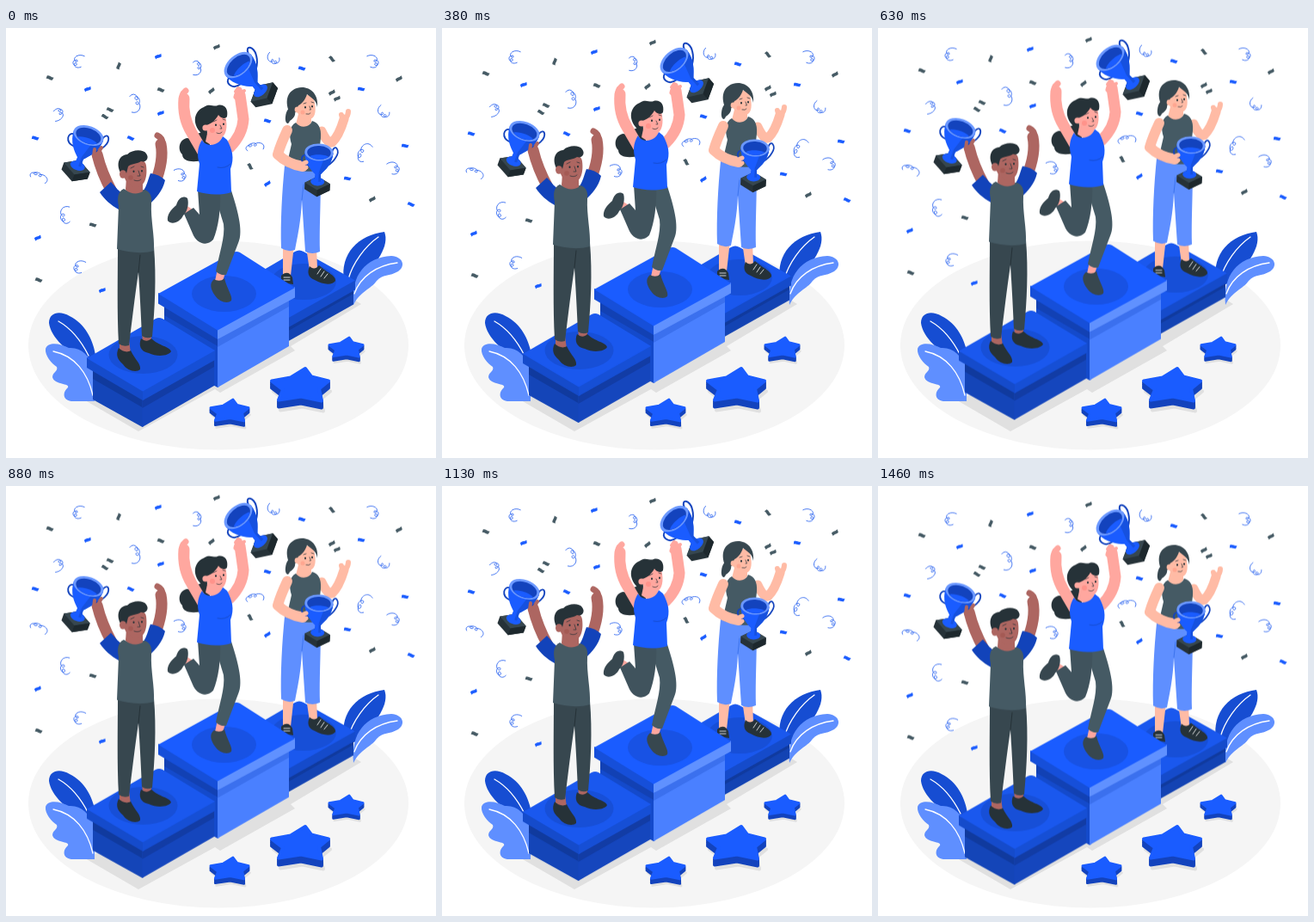
Write an HTML page that moves like this. It is 500 px wide and 500 px high and loops after 1.5 s.

```html
<!DOCTYPE html>
<html lang="en">
<head>
<meta charset="utf-8">
<title>Winners' podium</title>
<style>
html, body { margin: 0; width: 100%; height: 100%; overflow: hidden; background: #fff; }
svg { display: block; width: 100vw; height: 100vh; }
.line { fill: none; stroke-linecap: round; stroke-linejoin: round; }
.vein { stroke: #fff; stroke-width: 1.3; }
.face { stroke: #263238; stroke-width: .7; }
.eyes { stroke: #263238; stroke-width: 2; }
#curl { vector-effect: non-scaling-stroke; }
</style>
</head>
<body>
<svg viewBox="0 0 500 500">
  <defs>
    <path id="starTop" stroke-width="4" stroke-linejoin="round" d="M6 -19.500 L13 -10 L33 -5 L22 4 L25 18 L1 13 L-25 17 L-20 5 L-33 -5 L-11 -9Z"/>
    <g id="star">
      <use href="#starTop" y="12" x="2" fill="#e0e0e0" stroke="#e0e0e0"/>
      <g fill="#1343bd" stroke="#1343bd">
        <use href="#starTop" y="8"/><use href="#starTop" y="6"/><use href="#starTop" y="4"/><use href="#starTop" y="2"/>
      </g>
      <use href="#starTop" fill="#1a5cff" stroke="#1a5cff"/>
    </g>
    <g id="cup">
      <path fill="#263238" d="M-15.500 38 L0 29.500 L15.500 38 V46 L0 54.500 L-15.500 46Z"/>
      <path fill="#37474f" d="M-15.500 38 L0 29.500 L15.500 38 L0 46.500Z"/>
      <path fill="#1d282d" d="M0 46.500 L15.500 38 V46 L0 54.500Z"/>
      <ellipse cy="36" rx="8.500" ry="5" fill="#1a5cff"/>
      <path class="line" stroke="#1343bd" stroke-width="1.800" d="M-16 4 C-23 4 -23 16 -11 17 M16 -2 C19 -12 26 -4 21 5 C18 11 14 14 11 16"/>
      <path fill="#1a5cff" d="M-17.500 0 C-17 14 -9 22 -3.500 27 L-4 36 H4 L3.500 27 C9 21 16.500 14 17.500 0Z"/>
      <path fill="#1651df" d="M6 9 C11 8 16 5 17.500 0 C16.500 14 9 21 3.500 27 L4 36 H1 V25Z"/>
      <ellipse rx="17.500" ry="10.500" fill="#6b98ff"/>
      <ellipse cy=".5" rx="14.500" ry="8.400" fill="#1343bd"/>
      <path fill="#1a5cff" d="M-11 5.500 C-6 2 8 2 12 5 C7 10 -6 10 -11 5.500Z"/>
    </g>
    <path id="chip" d="M-4.500 -1 C-2 -3 1 -1 4.500 -2.500 L4 1.500 C1 3 -2 1 -4 3Z"/>
    <path id="curl" d="M9 -7 C0 -11 -8 -5 -5 -1 C-3 2 1 -1 -2 -2 C-9 -3 -9 5 -4 5 C-1 5 -2 1 -5 2 C-8 5 -3 10 4 7"/>
  </defs>

  <ellipse cx="247" cy="369" rx="221" ry="121.500" fill="#f5f5f5"/>
  <path fill="#e0e0e0" d="M92 433 L154 469 L243 420 L249 424 L336 375 L331 370 L413 321 L400 313 L240 370Z"/>

  <g id="leaves">
    <path fill="#164dd2" d="M98 387 C70 378 52 359 50 343 C50 331 62 328 74 335 C92 344 101 362 104 380Z"/>
    <path class="line vein" d="M61 341 C77 350 88 365 96 381"/>
    <path fill="#5f8fff" d="M103 434 H78 C66 434 65 424 72 418 C75 413 56 415 54 406 C54 400 61 399 59 394 C53 390 45 381 46 373 C49 364 64 367 73 372 C88 371 96 381 103 394Z"/>
    <path class="line vein" d="M55 376 C80 381 95 401 101 427"/>
    <path fill="#164dd2" d="M393 294 C388 262 410 241 440 237 C446 252 433 275 405 298Z"/>
    <path class="line vein" d="M433 243 C417 254 403 274 398 292"/>
    <path fill="#5f8fff" d="M404 322 C401 287 418 267 448 265 C462 266 465 277 456 283 C446 289 438 286 431 294 C424 304 412 306 404 322Z"/>
    <path class="line vein" d="M455 273 C431 276 412 289 405 309"/>
  </g>

  <use href="#star" transform="translate(342 415.500)"/>
  <use href="#star" transform="translate(260 445) scale(.67)"/>
  <use href="#star" transform="translate(395.500 371.500) scale(.6)"/>

  <g id="rise">
    <g id="chips"></g>
    <g id="curls" class="line" stroke="#2f67f0" stroke-width=".9"></g>

    <!-- right step: body, shade, slab edge, top -->
    <path fill="#1343b3" d="M404 300 V321.500 L325 366 V340Z"/>
    <path fill="#103a9e" d="M404 300 V309 L325 354 V340Z"/>
    <path fill="#154bcb" d="M406 292 V304.500 L325 350 V330Z"/>
    <path fill="#1a58ee" d="M300 281 L336 260 Q341 257 346 260 L406 293.500 L325 339Z"/>
    <ellipse cx="346" cy="295" rx="38" ry="21" fill="#174fd7"/>

    <g id="thirdWinner">
      <path fill="#ffbba5" d="M322 252 H335 L331 288 H322Z M349 254 H361 L362 280 L353 282Z"/>
      <path fill="#263238" d="M320 288 C325 283 330 284 333 290 L334 298 L320 296Z M353 277 C350 284 351 290 359 293 C369 299 380 299 383 294 C384 288 374 285 364 276 C360 281 356 280 353 277Z"/>
      <path class="line" stroke="#fff" stroke-width=".8" d="M323 290 H330 M323 293 H330 M362 286 L366 280 M366 289 L370 283 M370 291 L374 286"/>
      <path fill="#5f8fff" d="M324 160 L364 160 C368 180 364 220 365 260 Q356 264 348 260 L344 200 C343 225 339 242 336 258 Q328 261 320 256 C319 225 321 190 324 160Z"/>
      <path class="line" stroke="#3c74ee" stroke-width="1" d="M344 200 L346 182"/>
      <path class="line" stroke="#ffbba5" stroke-width="11" d="M367 120 Q374 135 379 133 Q387 126 393 106"/>
      <path class="line" stroke="#ffbba5" stroke-width="6" d="M392 108 L390 101 M394 106 Q398 102 398 97"/>
      <path fill="#ffbba5" d="M341 96 H355 V110 L347 119 L337 112Z"/>
      <path fill="#455a64" d="M337 110 C342 117 353 116 356 108 C363 110 367 116 366 128 C364 143 365 153 366 165 C353 169 338 166 326 161 L332 135 C329 126 329 114 337 110Z"/>
      <path class="line" stroke="#ffbba5" stroke-width="12" d="M327 119 Q319 136 316 147 Q327 158 345 161"/>
      <path fill="#37474f" d="M333 91 C339 99 336 104 330 108 C328 114 324 110 325 103 C326 96 328 93 333 91Z"/>
      <path fill="#ffbba5" d="M337 82 C342 74 358 76 359 87 C361 99 359 107 350 106 C342 106 336 99 337 82Z"/>
      <path fill="#37474f" d="M330 99 C324 87 326 74 338 70 C351 66 364 75 362 92 C361 84 355 81 350 77 C348 84 343 89 340 90 L337 98Z"/>
      <circle cx="339" cy="95" r="3.400" fill="#ffbba5"/>
      <path class="line face" d="M346 88 L349 87 M355 86 L358 87 M353 91 L354.500 95 H353 M349 100 Q353 101 354 99"/>
      <path class="line eyes" d="M348 92 V92.500 M356 91 V91.500"/>
      <circle cx="345" cy="98" r="2.500" fill="#ff937e" opacity=".5"/>
      <use href="#cup" transform="translate(364 144.500) rotate(3) scale(.95)"/>
      <path class="line" stroke="#ffbba5" stroke-width="5" d="M342 159 L349 156 M343 163 L349 162"/>
    </g>

    <!-- centre step -->
    <path fill="#144acb" d="M184 318 L248 350 V417 L246 418 L184 383Z"/>
    <path fill="#1241b4" d="M184 318 L248 350 V371 L184 334Z"/>
    <path fill="#4a80ff" d="M246 350 L329 306 V370 L246 418Z"/>
    <path fill="#3b70ee" d="M246 350 L329 310 V324 L246 371Z"/>
    <path fill="#164fd9" d="M177 308 V320.500 L246 362 L248 361 V345Z"/>
    <path fill="#6091ff" d="M246 345 L336 301 V313.500 L246 362Z"/>
    <path fill="#1a5cff" d="M177 309 L264 261 Q268 259 272 261 L336 302 L246 351.500Z"/>
    <ellipse cx="253.500" cy="309" rx="37.500" ry="21" fill="#1852e4"/>

    <g id="firstWinner">
      <path fill="#263238" d="M233 121 C223 119 217 130 211 128 C201 129 199 142 205 147 C205 156 220 157 230 153 C239 148 239 132 233 121Z"/>
      <path class="line" stroke="#ffa79f" stroke-width="13" d="M230 146 L216 122 Q205 104 207 82 M260 139 Q275 124 276 106 Q274 91 272 78"/>
      <path class="line" stroke="#ffa79f" stroke-width="7" d="M205 85 Q203 78 209 73 M268 80 L271 72"/>
      <path fill="#ffa79f" d="M206 204 L217 211 L211 219 L203 211Z M246 280 L256 282 L252 294 L243 294Z"/>
      <path fill="#37474f" d="M211 198 C205 194 200 199 198 206 C192 211 187 217 188 224 C193 230 203 225 206 218 C211 214 213 204 211 198Z M242 292 C236 297 238 304 243 311 C248 319 258 321 262 317 C264 312 257 304 254 291 C250 295 245 294 242 292Z"/>
      <path fill="#455a64" d="M236 188 L262 189 C268 208 277 236 270 250 L256 287 Q249 288 244 283 C248 262 255 243 253 228 L246 205Z"/>
      <path fill="#40535d" d="M223 188 H249 C250 211 247 232 241 246 C233 255 221 250 217 239 L207 216 L218 209 L225 217Z"/>
      <path fill="#ffa79f" d="M235 118 H251 L252 132 L243 139 L232 132Z"/>
      <path fill="#1a5cff" d="M228 130 C231 138 247 139 252 126 L257 130 C263 141 266 151 261 164 L262 191 C249 195 234 194 222 190 L225 158 C222 149 222 139 228 130Z"/>
      <path class="line" stroke="#164dd2" stroke-width="1" d="M246 162 Q255 164 261 158"/>
      <path fill="#ffa79f" d="M231 105 C236 94 255 96 256 107 C258 120 254 129 245 128 C236 127 231 119 231 105Z"/>
      <path fill="#263238" d="M230 125 C215 113 218 97 230 92 C236 87 242 92 246 90 C253 88 259 93 257 103 C254 107 249 104 247 101 C243 108 239 111 233 113 L234 122Z"/>
      <circle cx="232" cy="116" r="3.600" fill="#ffa79f"/>
      <path class="line face" d="M241 109 L245 107 M252 106 L255 107 M249 113 L251 117 H249 M245 122 Q249 124 251 121"/>
      <path class="line eyes" d="M244 112.500 V113 M253 111.500 V112"/>
      <circle cx="240" cy="119" r="3" fill="#ff7f78" opacity=".5"/>
      <use href="#cup" transform="translate(270 43) rotate(-41) scale(1.100)"/>
      <path class="line" stroke="#ffa79f" stroke-width="4" d="M267 74 L270 70 M273 75 L277 73"/>
    </g>

    <!-- left step -->
    <path fill="#1445b8" d="M101 390 L160 422 V463 L158.500 464 L101 432Z"/>
    <path fill="#103a9e" d="M101 390 L160 422 V442 L101 408Z"/>
    <path fill="#1546bd" d="M158.500 422 L242 376 V416 L158.500 464Z"/>
    <path fill="#123ca5" d="M158.500 422 L242 376 V394 L158.500 442Z"/>
    <path fill="#154bcb" d="M94 383 V395 L159 433 L161 432 V415Z"/>
    <path fill="#164fd5" d="M159 415 L243 374 V386 L159 433Z"/>
    <path fill="#1a58ee" d="M94 384 L174 338 Q178 336 182 338 L243 375 L159 422.500Z"/>
    <ellipse cx="159.500" cy="380" rx="40" ry="22" fill="#174fd7"/>

    <g id="secondWinner">
      <path fill="#ad6661" d="M132 363 H143 L145 378 H132Z M158 353 H169 V366 H159Z"/>
      <path fill="#263238" d="M131 372 C127 380 130 386 136 391 C141 399 152 401 156 397 C157 390 150 386 145 375 C141 378 135 376 131 372Z M157 361 C154 369 156 376 166 378 C176 383 190 381 192 376 C190 370 178 370 169 361 C165 365 161 364 157 361Z"/>
      <path fill="#37474f" d="M130 253 L172 255 C175 290 173 327 170 359 Q164 362 158 358 C157 330 155 300 154 284 C150 310 146 345 143 369 Q136 371 131 367 C129 330 130 290 130 253Z"/>
      <path class="line" stroke="#263238" stroke-width="1" d="M154 284 L156 264"/>
      <path class="line" stroke="#ad6661" stroke-width="13" d="M106 147 Q111 168 123 190 M180 135 Q184 154 173 181"/>
      <path class="line" stroke="#ad6661" stroke-width="7" d="M182 134 Q182 128 176 125 M104 148 L106 139"/>
      <path fill="#1243ba" d="M109 191 L122 179 C127 184 131 191 138 193 L131 211 C122 206 114 199 109 191Z M159 190 C164 184 165 176 168 169 Q178 170 185 177 C182 190 174 198 167 205Z"/>
      <path fill="#455a64" d="M137 187 C145 192 153 192 160 188 C167 189 170 195 169 204 C168 222 173 242 172 259 C158 263 143 261 129 257 L131 207 C129 198 130 190 137 187Z"/>
      <path fill="#ad6661" d="M140 174 H159 L159 190 C153 194 144 193 139 188Z"/>
      <path fill="#ad6661" d="M135 160 C136 150 162 148 163 160 C165 175 160 185 152 185 C144 186 136 178 135 160Z"/>
      <path fill="#263238" d="M133 168 C128 158 131 148 141 147 C147 141 160 141 163 146 C167 151 163 157 157 155 C151 159 146 157 142 161 L140 169Z"/>
      <ellipse cx="136" cy="170" rx="4" ry="4.800" fill="#ad6661"/>
      <path class="line face" d="M145 163 L149 161 M157 161 L160 162 M154 166 L156 172 H153 M149 177 Q154 179 157 176"/>
      <path class="line eyes" d="M148.500 166.500 V167 M158 166 V166.500"/>
      <circle cx="145" cy="174" r="2.800" fill="#9c4e48" opacity=".5"/>
      <use href="#cup" transform="translate(96 125) rotate(20) scale(1.040)"/>
      <path class="line" stroke="#ad6661" stroke-width="4" d="M102 149 L103 141 M107 146 L111 139"/>
    </g>
  </g>
</svg>
<script>
const byId = id => document.getElementById(id);

function place(group, shape, x, y, angle, scale, fill) {
  const use = document.createElementNS('http://www.w3.org/2000/svg', 'use');
  use.setAttribute('href', '#' + shape);
  use.setAttribute('transform', `translate(${x} ${y}) rotate(${angle}) scale(${scale})`);
  if (fill) use.setAttribute('fill', fill);
  byId(group).append(use);
}

// x, y, angle
const blueChips = [
  [177, 33, -15], [95, 71, -15], [180, 99, -15], [34, 128, 20], [145, 128, 30],
  [304, 108, 20], [344, 47, 20], [413, 71, 15], [464, 137, 15], [397, 175, 15],
  [471, 205, 30], [304, 181, -30], [37, 244, -20], [112, 305, -15]
];
const darkChips = [
  [51, 58, 25], [131, 44, -65], [121, 95, 30], [115, 103, 35], [180, 72, 25],
  [239, 73, -35], [245, 22, -20], [379, 36, 55], [457, 59, -25], [379, 75, -25],
  [385, 82, -20], [284, 161, 65], [426, 199, -25], [101, 229, 20], [38, 293, 25]
];
for (const [x, y, a] of blueChips) place('chips', 'chip', x, y, a, .9, '#1a5cff');
for (const [x, y, a] of darkChips) place('chips', 'chip', x, y, a, .9, '#455a64');

// x, y, angle, scale
const curls = [
  [84, 39, 0, '.8 .9'], [61, 100, 150, '.8'], [150, 87, 160, '.8 1.3'], [222, 46, 165, '.7 1'],
  [311, 36, -75, '.7 .9'], [427, 39, 180, '.8 -.9'], [439, 98, -65, '.7 .9'], [416, 145, 20, '.8 1.4'],
  [451, 163, 170, '.8 -.9'], [38, 173, 105, '.6 1.3'], [69, 218, -15, '.8 1.2'], [85, 278, 5, '.8 .9'],
  [203, 171, 175, '.8 -.9'], [289, 138, 75, '.6 1.3']
];
for (const [x, y, a, s] of curls) place('curls', 'curl', x, y, a, s);

byId('rise').animate(
  [0, -10, 0].map(y => ({ transform: `translateY(${y}px)` })),
  { duration: 1500, iterations: Infinity, easing: 'linear' }
);
</script>
</body>
</html>
```
